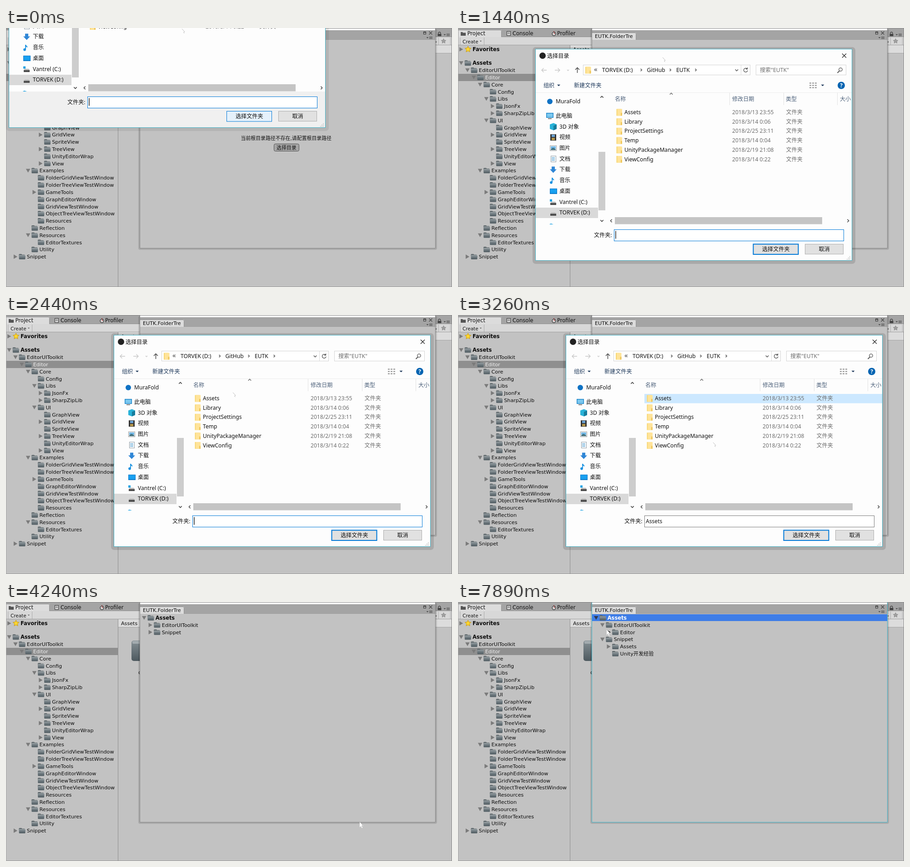
An HTML page that plays this animation: 981 px wide and 571 px high, repeating every 8000 ms.

```html
<!DOCTYPE html>
<html lang="zh-CN">
<head>
<meta charset="utf-8">
<title>Folder picker</title>
<style>
html, body { margin: 0; width: 100%; height: 100%; overflow: hidden; background: #c2c2c2; }
svg { display: block; width: 100vw; height: 100vh; }
text { white-space: pre; }
.ed { font-family: "DejaVu Sans", "Noto Sans CJK SC", "Noto Sans CJK", sans-serif; font-size: 11.15px; }
.dl { font-family: "Noto Sans", "Noto Sans CJK SC", "Noto Sans CJK", sans-serif; font-size: 12.1px; }
</style>
</head>
<body>
<svg id="stage" viewBox="0 0 981 571" preserveAspectRatio="none"></svg>
<script>
const stage = document.getElementById('stage');

// Markup helpers: text is placed by its left edge and vertical middle.
const rect = (x, y, w, h, fill, more = '') => `<rect x="${x}" y="${y}" width="${w}" height="${h}" fill="${fill}" ${more}/>`;
const box = (x, y, w, h, fill, line, more = '') => rect(x + .5, y + .5, w - 1, h - 1, fill, `stroke="${line}" ${more}`);
const fillPath = (d, fill, more = '') => `<path d="${d}" fill="${fill}" ${more}/>`;
const line = (d, color, w = 1, more = '') => `<path d="${d}" fill="none" stroke="${color}" stroke-width="${w}" ${more}/>`;
const dot = (x, y, r, fill) => `<circle cx="${x}" cy="${y}" r="${r}" fill="${fill}"/>`;
const text = (cls, x, y, s, fill = '#111', more = '') => `<text class="${cls}" x="${x}" y="${y + 4}" fill="${fill}" ${more}>${s}</text>`;
const ed = (x, y, s, fill = '#0c0c0c', more) => text('ed', x, y, s, fill, more);
const dl = (x, y, s, fill, more) => text('dl', x, y, s, fill, more);
const group = (id, body, more = '') => `<g id="${id}" ${more}>${body}</g>`;
const size = px => `style="font-size:${px}px"`;
const bold = 'font-weight="700" ' + size(11.4);

const chevron = (x, y, dir, color = '#444', s = 3.2) => {
  const d = { up: `M${x - s} ${y + s / 2}l${s} ${-s} ${s} ${s}`, down: `M${x - s} ${y - s / 2}l${s} ${s} ${s} ${-s}`,
    left: `M${x + s / 2} ${y - s}l${-s} ${s} ${s} ${s}`, right: `M${x - s / 2} ${y - s}l${s} ${s} ${-s} ${s}` }[dir];
  return line(d, color, 1.5);
};
const caretDown = (x, y, color, s = 3.5) => fillPath(`M${x - s} ${y - s / 2}h${2 * s}l${-s} ${s}z`, color);

const greyFolder = (x, y) =>
  fillPath(`M${x} ${y - 4.5}q0-1.5 1.5-1.5h4q1 0 1.5 1.5h5q1.5 0 1.5 1.5v1h-13.5z`, '#5f686c') +
  fillPath(`M${x} ${y - 2.2}h14.5l-.4 7q-.1 1-1 1h-11.7q-1 0-1.1-1z`, 'url(#slate)') +
  line(`M${x + .6} ${y - 2.8}h13`, '#b4bcbf', .9);
const yellowFolder = (x, y) =>
  rect(x, y - 7.5, 10, 15, '#f7d774') + rect(x + 2, y - 7.5, 10.5, 14.5, '#ffe49a') + rect(x + 9.5, y + 1, 3, 6.5, '#efc75e');

const foldArrow = (x, y, open, color = '#7b7b7b') =>
  fillPath(open ? `M${x - 4.8} ${y - 4}h9.6l-4.8 8.2z` : `M${x - 4} ${y - 4.8}l8.2 4.8-8.2 4.8z`, color);

// Each row: depth, fold mark (v open, > closed, - none), name.
function tree(rows, x0, y0, color = () => '#0c0c0c', arrowColor = () => undefined) {
  return rows.trim().split(/\s+/).map((row, i) => {
    const depth = +row[0], mark = row[1], name = row.slice(2);
    const x = x0 + depth * 13.85, y = y0 + i * 15.81;
    return (mark === '-' ? '' : foldArrow(x + 7, y, mark === 'v', arrowColor(name, depth))) +
      greyFolder(x + 14.5, y) + ed(x + 32, y, name, color(name, depth), depth ? '' : bold);
  }).join('');
}

const projectRows = `0vAssets 1vEditorUIToolkit 2vEditor 3vCore 4-Config 4vLibs 5>JsonFx 5>SharpZipLib
  4vUI 5-GraphView 5>GridView 5-SpriteView 5>TreeView 5-UnityEditorWrap 5>View 3vExamples
  4-FolderGridViewTestWindow 4-FolderTreeViewTestWindow 4>GameTools 4-GraphEditorWindow
  4-GridViewTestWindow 4-ObjectTreeViewTestWindow 4-Resources 3-Reflection 3vResources
  4-EditorTextures 3-Utility 1>Snippet`;

const menuIcon = (x, y) => caretDown(x - 4, y, '#444', 2.5) + line(`M${x} ${y - 2}h7M${x} ${y}h7M${x} ${y + 2}h7`, '#555', 1);
const star = (x, y, r, fill, edge) => {
  let d = '';
  for (let i = 0; i < 10; i++) {
    const a = i * Math.PI / 5 - Math.PI / 2, q = i % 2 ? r * .48 : r;
    d += (i ? 'L' : 'M') + (x + q * Math.cos(a)).toFixed(1) + ' ' + (y + q * Math.sin(a)).toFixed(1);
  }
  return fillPath(d + 'z', fill, `stroke="${edge}"`);
};

function projectPanel() {
  return rect(0, 0, 981, 571, '#c2c2c2') + rect(0, 0, 981, 20, '#a4a4a4') +
    rect(0, 20, 981, 18, '#d8d8d8') + rect(96, 19, 885, 1, '#929292') + rect(0, 37, 981, 1, '#a0a0a0') +
    fillPath('M0 20V4H93q3 0 3 3v13z', '#dcdcdc') + line('M0 4.5H93q2.5 0 2.5 3V20', '#929292') +
    fillPath('M6 9h4l1 1.5h6V17H6z', '#555') + ed(20.5, 12, 'Project', '#111', size(11.6)) +
    box(107, 7, 9, 10, '#ddd', '#333') + line('M109 10h5M109 12.5h5', '#555') + ed(120, 12, 'Console', '#111', size(11.5)) +
    `<circle cx="211" cy="13" r="3.8" fill="#ddd" stroke="#333" stroke-width="1.3"/>` + line('M211 13l2-2.5M211 7v2', '#a22', 1.3) +
    ed(218, 12, 'Profiler', '#111', size(11.5)) +
    ed(10, 29.5, 'Create', '#111', size(10.4)) + caretDown(50, 29, '#444', 2) + rect(4, 21, 1, 16, '#aaa') + rect(57, 21, 1, 16, '#aaa') +
    foldArrow(7, 47, false) + star(22, 47, 7, '#ffd62e', '#c79a10') + ed(32, 47, 'Favorites', '#0c0c0c', bold) +
    rect(0, 101, 246, 16, '#8f8f8f') + tree(projectRows, 0, 77.3, name => name === 'Editor' ? '#f2f2f2' : '#0c0c0c') +
    rect(246, 38, 735, 17, '#dcdcdc') + rect(246, 55, 735, 1, '#a5a5a5') + rect(246, 38, 1, 533, '#8e8e8e') + ed(253, 47, 'Assets') +
    rect(276, 85, 30, 45, 'url(#slate)', 'rx="5"') + rect(278, 86, 28, 6, '#a3abaf', 'rx="2"') + ed(291, 155, 'c') +
    rect(949.5, 13, 8, 5, '#444') + line('M951 13v-2q0-2 2.4-2t2.4 2v2', '#444', 1.3) + menuIcon(969, 15) +
    rect(951, 21, 1, 16, '#aaa') + rect(977, 21, 1, 16, '#aaa') + star(962.5, 29, 5.5, '#a0a0a0', '#8c8c8c') + caretDown(946, 31, '#444', 2) +
    rect(0, 0, 981, 1, '#8c8c8c') + rect(980, 0, 1, 571, '#8c8c8c') + rect(0, 570, 981, 1, '#999') + rect(0, 0, 1, 571, '#aaa');
}

const small = '0vAssets 1>EditorUIToolkit 1>Snippet';
const snippetOpen = '0vAssets 1>EditorUIToolkit 1vSnippet 2>Assets 2-Unity开发经验';
const bothOpen = '0vAssets 1vEditorUIToolkit 2>Editor 1vSnippet 2>Assets 2-Unity开发经验';
const selected = (rows, pressed) => rect(295, 27, 649, 15, '#3e7de7') +
  tree(rows, 296.8, 35, (name, depth) => depth ? '#0c0c0c' : '#fff',
    (name, depth) => !depth ? '#2f3a50' : name === 'Editor' && pressed ? '#000' : undefined);
const views = [
  ed(516.5, 243, '当前根目录路径不存在,请配置根目录路径', '#111', size(10.9)) +
    box(589, 255, 56, 17, '#a6a6a6', '#4e4e4e', 'rx="3"') + ed(595, 263.5, '选择目录', '#111', size(10.9)),
  tree(small, 296.8, 35), tree(snippetOpen, 296.8, 35),
  selected(snippetOpen), selected(bothOpen), selected(bothOpen, true)
];

function toolPanel() {
  return rect(291, 2, 657, 487, '#000', 'opacity=".13" rx="4"') + rect(294, 0, 651, 486, '#c2c2c2') +
    rect(295, 1, 649, 4, '#f6f6f6') + rect(295, 5, 649, 21, '#a4a4a4') + rect(295, 25, 649, 1, '#9c9c9c') +
    fillPath('M295 26V10H389q3 0 3 3v13z', '#dcdcdc') + line('M295 10.5H389q2.5 0 2.5 3V26', '#929292') +
    ed(301, 18, 'EUTK.FolderTre') +
    box(918, 9, 6, 5, 'none', '#333') + rect(918, 8, 6, 2, '#333') + line('M930.5 7.5l7 7M937.5 7.5l-7 7', '#444', 1.2) + menuIcon(931, 21.5) +
    views.map((v, i) => group('view' + i, v)).join('') +
    rect(294, 0, 651, 1, '#8c8c8c') + group('edge', line('M294.5 1V485.5H944.5V1', 'currentColor'));
}

const note = (x, y) => line(`M${x + 5} ${y + 4}v-10q1 3 4 5`, '#1590e0', 1.8) + dot(x + 3, y + 4.5, 2.8, '#1590e0');
const drive = (x, y) => rect(x, y + 1, 13, 4.5, '#4a4a4a') + fillPath(`M${x} ${y + 1}l2-2.5h9l2 2.5z`, '#bbb');

const places = [
  ['3D 对象', (x, y) => fillPath(`M${x} ${y - 5}l8-3 7 3v10l-7 3-8-3z`, '#28b2d8') + fillPath(`M${x + 8} ${y - 2}l7-3v10l-7 3z`, '#167c9c')],
  ['视频', (x, y) => rect(x + 1, y - 7, 13, 14, '#333') + rect(x + 4, y - 6, 7, 5, '#6da6d8') + rect(x + 4, y + 1, 7, 5, '#b99a4c')],
  ['图片', (x, y) => box(x, y - 6, 15, 12, '#fff', '#999') + rect(x + 2, y - 4, 11, 5, '#72b7e5') + fillPath(`M${x + 2} ${y + 4}v-2l5-3 6 3v2z`, '#406f7c')],
  ['文档', (x, y) => box(x + 2, y - 7, 12, 14, '#fff', '#8d9aa4') + line(`M${x + 4} ${y - 3}h7M${x + 4} ${y}h7M${x + 4} ${y + 3}h7`, '#4b9bd0', 1.2)],
  ['下载', (x, y) => fillPath(`M${x + 4} ${y - 7}h7v6h4l-7.5 8-7.5-8h4z`, '#2f86d6')],
  ['音乐', note],
  ['桌面', (x, y) => rect(x, y - 6, 16, 12, '#0b78c8') + rect(x + 1, y - 5, 14, 9, '#18a0f0')],
  ['Vantrel (C:)', (x, y) => drive(x + 1, y + 1) + rect(x, y - 6, 5, 5, '#1ba1e2')],
  ['TORVEK (D:)', (x, y) => drive(x + 1, y + 1)]
];
const files = [['Assets', '3/13 23:55'], ['Library', '3/14 0:06'], ['ProjectSettings', '2/25 23:11'],
  ['Temp', '3/14 0:04'], ['UnityPackageManager', '2/19 21:08'], ['ViewConfig', '3/14 0:22']];

function dialog() {
  const navy = '#1e395b', head = '#4c607a', dim = '#6d6d6d';
  let s = rect(231, 40, 710, 478, '#000', 'id="shade" rx="7" opacity=".13"') + rect(237, 44, 697, 467, '#fdfdfd') +
    rect(238, 431, 695, 79, '#f0f0f0', 'id="foot"');
  s += group('mark', dot(253, 59, 7, '#222') + line('M912 54.5l9 9M921 54.5l-9 9', '#222', 1.2)) + group('title', dl(263, 59.5, '选择目录'));
  s += line('M262 91h-11M255.5 86.5l-4.5 4.5 4.5 4.5M280 91h11M286.5 86.5l4.5 4.5-4.5 4.5', '#c9c9c9', 1.4) + chevron(309, 91, 'down', '#ccc', 2) +
    line('M329.5 97v-11M325 90l4.5-4.5 4.5 4.5', '#555', 1.6);
  s += box(342, 79, 368, 23, '#fff', '#d4d4d4') + rect(689, 80, 1, 21, '#d9d9d9') + yellowFolder(347, 91) + dl(366, 90, '«', '#444', size(15)) +
    dl(384, 90.5, 'TORVEK (D:)') + dl(482.5, 90.5, 'GitHub') + dl(547, 90.5, 'EUTK') +
    [470, 534, 590].map(x => chevron(x, 90.5, 'right', '#555', 2.6)).join('') + chevron(680, 91, 'down', '#666') +
    line('M703 88a4.3 4.3 0 1 0 1 3.5M703.5 85v3.5h-3.5', '#555', 1.3);
  s += box(722, 79, 199, 23, '#fff', '#d4d4d4') + dl(731, 91, '搜索"EUTK"', dim) +
    '<circle cx="908.5" cy="89.5" r="3.7" fill="none" stroke="#555" stroke-width="1.3"/>' + line('M906 92.5l-4.5 4.5', '#555', 1.8);
  s += dl(255, 124.5, '组织', navy) + caretDown(288.5, 124.5, navy) + dl(322, 124.5, '新建文件夹', navy) +
    line('M840 119.5h4M846 119.5h4M852 119.5h4M840 124.5h4M846 124.5h4M852 124.5h4M840 129.5h4M846 129.5h4M852 129.5h4', '#8b8b8b', 2) +
    caretDown(869, 124.5, navy) + dot(910, 124.5, 8, '#0063b1') + dl(907.3, 124.5, '?', '#fff', 'font-weight="700"');
  s += rect(238, 140, 695, 1, '#ededed') + [664, 783, 901].map(x => rect(x, 141, 1, 27, '#e2e2e2')).join('') + chevron(536, 143, 'up', '#777') +
    dl(412, 154.5, '名称', head) + dl(670, 154.5, '修改日期', head) + dl(788, 154.5, '类型', head) + dl(907, 154.5, '大小', head);
  // Navigation pane
  s += rect(376, 271, 15, 129, '#cdcdcd') + chevron(383.5, 150, 'up') + chevron(383.5, 423, 'down') +
    dot(269, 160, 6, '#0f72c4') + dl(282, 160, 'MuraFold') +
    rect(261, 185, 16, 11, '#2489ca') + rect(262.5, 186.5, 13, 8, '#7cc9f0') + rect(265, 197, 8, 1.5, '#555') + dl(282, 191.5, '此电脑') +
    rect(238, 394, 137, 23, '#d9d9d9') + fillPath('M268 431q3-3 6-1l3 1z', '#1ba1e2');
  places.forEach(([name, icon], i) => { const y = 215.5 + 23.73 * i; s += icon(269, y) + dl(290, y, name); });
  // File list
  s += rect(410, 174, 523, 20.5, '#d9d9d9', 'id="row"');
  files.forEach(([name, date], i) => {
    const y = 184 + 20.7 * i;
    s += yellowFolder(415.5, y) + dl(433, y, name) + dl(670, y, '2018/' + date, dim) + dl(788.5, y, '文件夹', dim);
  });
  s += rect(412, 415, 456, 15.5, '#c4c4c4') + chevron(404, 423, 'left') + chevron(925, 423, 'right');
  // Name field and buttons
  s += dl(366, 455, '文件夹:') + box(410, 442, 506, 26, '#fff', 'currentColor', 'id="field"') +
    rect(413.3, 445.5, 1.3, 17, '#000', 'id="caret"') + group('typed', dl(413, 454.5, 'Assets')) +
    rect(716.5, 474.5, 99, 22.5, '#e1e1e1', 'id="ok" stroke="#0078d7"') + dl(736, 485.5, '选择文件夹') +
    box(830, 474, 85, 23, '#e1e1e1', '#adadad') + dl(860.5, 485.5, '取消');
  for (let i = 0; i < 3; i++) for (let j = 0; j <= i; j++) s += rect(922 + 3 * i, 507 - 3 * j, 1.6, 1.6, '#bbb');
  return s + box(237, 44, 697, 467, 'none', '#43b4c8');
}

stage.innerHTML = `<defs>
  <linearGradient id="slate" x2="0" y2="1"><stop stop-color="#858f94"/><stop offset="1" stop-color="#4d595f"/></linearGradient>
  <clipPath id="dialogClip"><path d="M225 36h719v485H225z"/></clipPath></defs>` +
  projectPanel() + toolPanel() + group('dialog', dialog(), 'clip-path="url(#dialogClip)"') +
  group('cursor', fillPath('M0 0V11.5L2.8 9 4.6 13.2 6.4 12.4 4.7 8.4H8.3z', '#fff') + line('M1 .8L7 7.4 4.7 8.2 6 11', '#aaa', .8));

const part = {};
stage.querySelectorAll('[id]').forEach(e => part[e.id] = e);
const show = (id, on) => part[id].style.display = on ? '' : 'none';
const set = (id, attrs) => { for (const k in attrs) part[id].setAttribute(k, attrs[k]); };
const at = (keys, t) => keys.reduce((cur, k) => t >= k[0] ? k : cur);

const dialogPath = [[0, -231, -291], [1440, -67, 2], [1560, 3, 6], [1690, 0, 0]];
const cursorPath = [
  [0, 386, 1], [1440, 449, 64], [1560, 519, 68], [1690, 516, 62], [1840, 516, 72], [1990, 512, 100], [2140, 505, 132], [2290, 500, 156],
  [2440, 498, 170], [2590, 490, 176], [2720, 482, 180], [2990, 500, 210], [3130, 560, 280], [3270, 640, 370], [3420, 710, 440], [3570, 760, 478],
  [3700, 778, 485], [4540, 690, 350], [4690, 608, 228], [5000, 560, 200], [5150, 470, 150], [5300, 390, 105], [5460, 335, 76], [5620, 318, 66],
  [5920, 322, 56], [6090, 335, 40], [6550, 325, 48], [6700, 314, 46], [7130, 320, 51], [7440, 321, 65], [7600, 330, 68], [7740, 329, 64], [7890, 327, 61]];
const viewTimes = [[0, 0], [4120, 1], [5620, 2], [6090, 3], [6850, 4], [7740, 5]];
const okStates = [[0, '#e5f1fb', '#0078d7', 1], [150, '#e3e9ee', '#0078d7', 1.5], [300, '#e1e1e1', '#0078d7', 2],
  [3570, '#e5f1fb', '#0078d7', 1], [3840, '#cce4f7', '#005499', 1]];

function draw(t) {
  const [, dx, dy] = at(dialogPath, t), [, cx, cy] = at(cursorPath, t), view = at(viewTimes, t)[1];
  set('dialog', { transform: `translate(${dx} ${dy})`, opacity: t >= 4120 ? .5 : 1 });
  show('dialog', t < 4240);
  set('cursor', { transform: `translate(${cx} ${cy})` });
  views.forEach((_, i) => show('view' + i, i === view));
  set('edge', { color: t < 5000 ? '#858585' : '#3fb6cb' });

  const [, fill, stroke, width] = at(okStates, t);
  set('ok', { fill, stroke, 'stroke-width': width });
  set('foot', { fill: t < 1440 ? '#f0f0f0' : '#fdfdfd' });
  set('shade', { opacity: t < 1440 ? .07 : .13 });
  show('caret', t < 580 || (t >= 1140 && t < 2720));
  show('typed', t >= 2720);
  set('field', { color: t < 2990 ? '#0078d7' : '#7a7a7a' });
  show('row', t >= 2590);
  set('row', { fill: t < 2720 ? '#e5f3ff' : t < 3840 ? '#cce8ff' : '#d9d9d9' });
  show('mark', t < 3990);
  set('title', { transform: `translate(${t < 3990 ? 0 : -18} 0)` });
}

const start = performance.now();
function tick() {
  draw((performance.now() - start) % 8000);
  requestAnimationFrame(tick);
}
draw(0);
requestAnimationFrame(tick);
</script>
</body>
</html>
```
